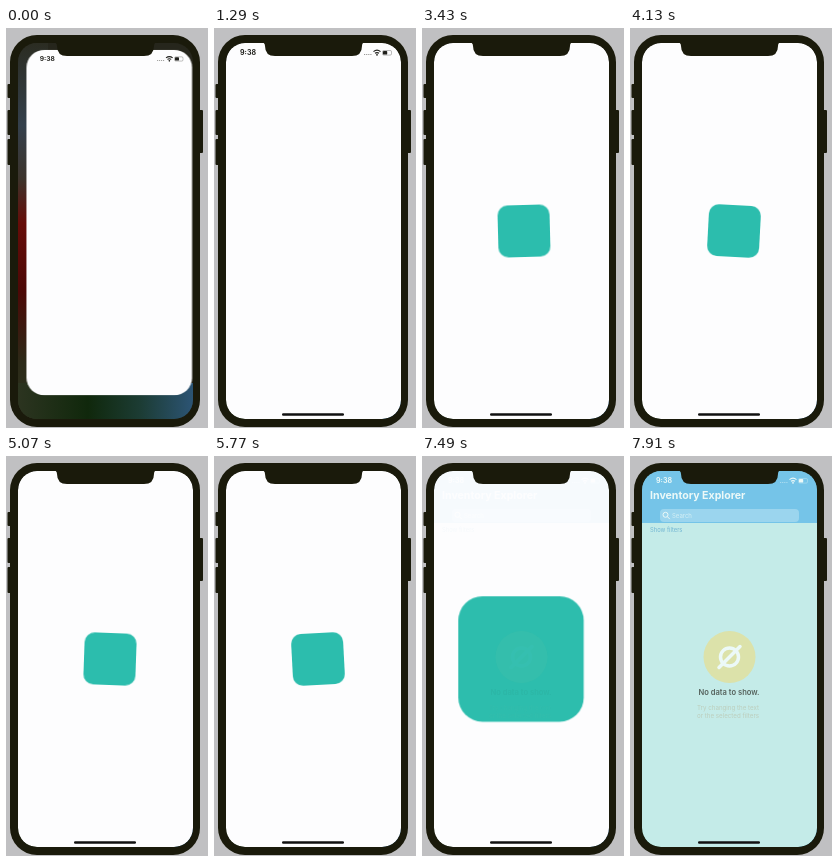
An HTML page for the animation above (8 s loop, 202 by 400 pixels).

```html
<!DOCTYPE html>
<html lang="en">
<head>
<meta charset="utf-8">
<title>App launch</title>
<style>
  html, body { margin: 0; width: 100%; height: 100%; overflow: hidden; background: #c0c0c2; }
  svg { display: block; width: 202px; height: 400px; font-family: Inter, Roboto, sans-serif; }

  .app, .status, .content, .tile, .wobble, .zoom, .home { animation: 8s linear infinite both; }
  .app { transform-origin: 12px 15px; animation-name: open; }
  .home { animation-name: home; }
  .status { animation-name: status; }
  .content { animation-name: content; }
  .tile { animation-name: tile; }
  .wobble, .zoom { transform-box: fill-box; transform-origin: center; }
  .wobble { animation-name: wobble; animation-timing-function: ease-in-out; }
  .zoom { animation-name: zoom; }

  @keyframes open {
    0% { transform: translate(8.5px, 7px) scale(.946, .918); animation-timing-function: ease-out; }
    4%, 100% { transform: none; }
  }
  @keyframes home {
    0%, 1% { opacity: 0; }
    4%, 100% { opacity: 1; }
  }
  @keyframes status {
    0%, 35% { opacity: 1; }
    38.5%, 100% { opacity: 0; }
  }
  @keyframes tile {
    0%, 31.9% { opacity: 0; }
    33.6% { opacity: .42; }
    36.3%, 93.6% { opacity: 1; }
    98.9% { opacity: .27; }
    100% { opacity: .2; }
  }
  @keyframes wobble {
    0%, 41% { transform: none; }
    44.8%, 58.5%, 72.1%, 85.8% { transform: translateX(4px) rotate(-3deg); }
    51.6%, 65.3%, 79% { transform: translateX(4px) rotate(3deg); }
    91%, 100% { transform: translateX(-1px); }
  }
  @keyframes zoom {
    0%, 90.6% { transform: scale(1); animation-timing-function: ease-in; }
    93.6% { transform: scale(2.38); animation-timing-function: cubic-bezier(.45, .2, .8, .6); }
    98.9% { transform: scale(12.5); }
    100% { transform: scale(16); }
  }
  @keyframes content {
    0%, 92.8% { opacity: 0; }
    93.6% { opacity: .035; }
    98.9% { opacity: .68; }
    100% { opacity: .8; }
  }
</style>
</head>
<body>
<svg viewBox="0 0 202 400">
  <defs>
    <clipPath id="screen"><rect x="12" y="15" width="175" height="376" rx="19"/></clipPath>
    <linearGradient id="side" x2="0" y2="1">
      <stop offset="0" stop-color="#2b2c22"/>
      <stop offset=".22" stop-color="#34404c"/>
      <stop offset=".36" stop-color="#3c342c"/>
      <stop offset=".48" stop-color="#660c08"/>
      <stop offset=".66" stop-color="#4c0806"/>
      <stop offset=".85" stop-color="#2c2a18"/>
      <stop offset="1" stop-color="#2c3420"/>
    </linearGradient>
    <linearGradient id="floor">
      <stop offset="0" stop-color="#2c3420"/>
      <stop offset=".4" stop-color="#10280c"/>
      <stop offset=".7" stop-color="#1c3c34"/>
      <stop offset="1" stop-color="#2c5474"/>
    </linearGradient>
    <g id="bar">
      <text x="26" y="27.3" font-size="7" font-weight="700">9:38</text>
      <path d="M150 26.5h7.5" fill="none" stroke="currentColor" stroke-dasharray="1.2 .9" opacity=".45"/>
      <g fill="none" stroke="currentColor" stroke-width="1.2">
        <path d="M159.5 23.6q3.5-2.8 7 0M161 25.3q2-1.5 4 0"/>
      </g>
      <circle cx="163" cy="26.8" r=".9"/>
      <rect x="168.5" y="22.5" width="9" height="4.6" rx="1.3" fill="none" stroke="currentColor" stroke-width=".6" opacity=".5"/>
      <rect x="169" y="23" width="4.2" height="3.6" rx=".7"/>
    </g>
  </defs>

  <rect width="202" height="400" fill="#c0c0c2"/>
  <g fill="#1a1a0b">
    <rect x="1.5" y="56" width="5" height="14" rx="1"/>
    <rect x="1.5" y="82" width="5" height="25" rx="1"/>
    <rect x="1.5" y="111" width="5" height="26" rx="1"/>
    <rect x="192" y="82" width="5" height="43" rx="1"/>
    <rect x="4" y="7" width="190" height="392" rx="27"/>
  </g>

  <g clip-path="url(#screen)">
    <rect x="12" y="15" width="175" height="376" fill="#26261c"/>
    <rect x="12" y="15" width="30" height="376" fill="url(#side)"/>
    <rect x="12" y="355" width="175" height="36" fill="url(#floor)"/>

    <g class="app">
      <rect x="12" y="15" width="175" height="376" rx="19" fill="#fdfdfe"/>
      <g class="status" fill="#20201c" color="#20201c"><use href="#bar"/></g>

      <g class="tile"><g class="wobble"><g class="zoom">
        <rect x="74" y="177" width="52" height="52" rx="10" fill="#2cbdad"/>
      </g></g></g>

      <g class="content">
        <rect x="12" y="15" width="175" height="52" fill="#50b2e8"/>
        <g fill="#fff" color="#fff"><use href="#bar"/></g>
        <text x="20" y="43" font-size="10.6" font-weight="700" fill="#fff">Inventory Explorer</text>
        <rect x="30" y="53" width="139" height="13" rx="4" fill="#fff" opacity=".32"/>
        <g fill="none" stroke="#fff">
          <circle cx="35.5" cy="58.8" r="2.5"/>
          <path d="M37.4 60.7l2.4 2.4"/>
        </g>
        <text x="42" y="62" font-size="6" fill="#fff" opacity=".7">Search</text>
        <text x="20" y="76" font-size="5.8" fill="#4a9cc8">Show filters</text>

        <circle cx="99.5" cy="201" r="26" fill="#e8de8c"/>
        <g fill="none" stroke="#fff" stroke-width="3.5" stroke-linecap="round">
          <circle cx="99.5" cy="201" r="9"/>
          <path d="M89 211.5l21-21"/>
        </g>
        <g text-anchor="middle">
          <text x="99" y="238.5" font-size="7.6" font-weight="600" fill="#22221c">No data to show.</text>
          <g font-size="6.2" fill="#b9c0a8">
            <text x="98" y="254">Try changing the text</text>
            <text x="98" y="262">or the selected filters</text>
          </g>
        </g>
      </g>
    </g>
  </g>

  <path d="M46 14h106q-4 0-4 4q0 10-10 10H61q-10 0-10-10q0-4-5-4z" fill="#1a1a0b"/>
  <rect class="home" x="68" y="385.3" width="62" height="2.4" rx="1.2" fill="#111"/>
</svg>
</body>
</html>
```
